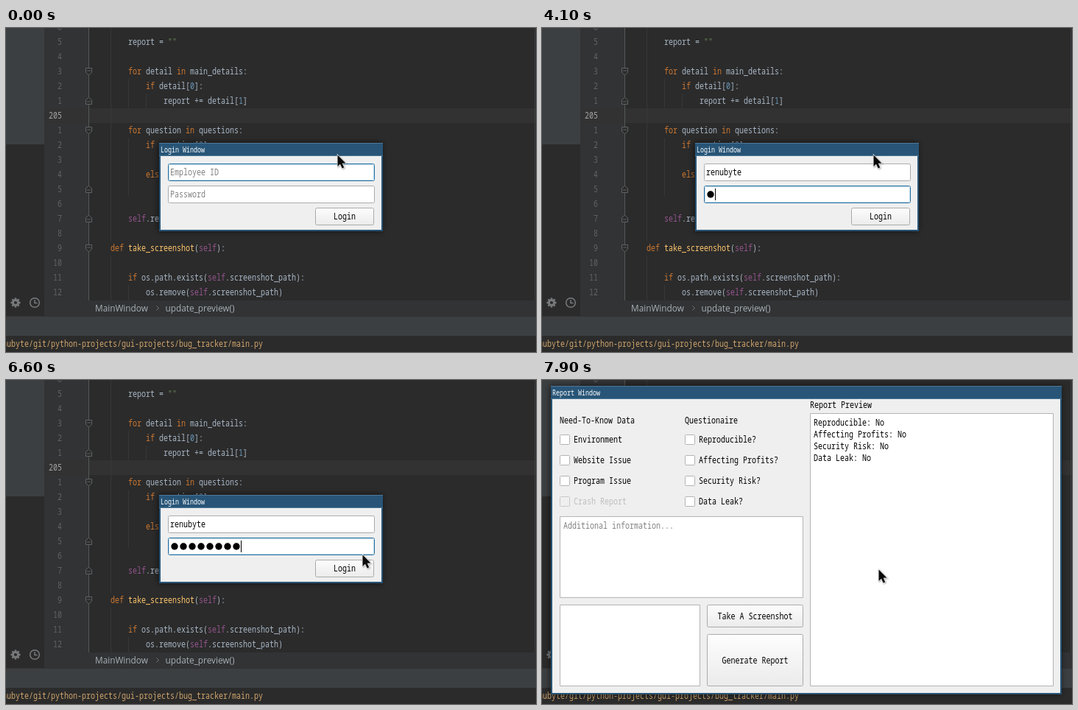
An HTML page with a canvas that plays this animation: 720x440 px, repeating every 8 s.

```html
<!DOCTYPE html>
<html lang="en">
<head>
<meta charset="utf-8">
<title>Login to report window</title>
<style>
html, body { margin: 0; width: 100%; height: 100%; overflow: hidden; background: #2b2b2b; }
canvas { display: block; width: 720px; height: 440px; }
</style>
</head>
<body>
<canvas id="stage" width="720" height="440"></canvas>
<script>
const ctx = document.getElementById('stage').getContext('2d');
const LOOP = 8000;
const USER = 'renubyte';
const CONDENSE = 5 / 6; // narrow coding face: advance is half the font size
const BLUE = '#285577', FOCUS = '#2670a0', OUTLINE = '#ababab', FACE = '#efefef';

// Time at which each value starts.
const typed = [[0, 0], [1200, 1], [1400, 2], [1500, 3], [1800, 4], [1900, 5], [2300, 6], [2700, 7], [2900, 8]];
const dots = [[0, 0], [4100, 1], [4300, 3], [4600, 4], [5000, 5], [5100, 6], [5200, 7], [5500, 8]];
const caret = [[0, 0], [100, 1], [500, 0], [1000, 1], [3500, 0], [3600, 1], [6100, 0], [6600, 1], [7100, 0]];
const at = (track, t) => track.findLast(([start]) => t >= start)[1];

function rect(x, y, w, h, color) {
  ctx.fillStyle = color;
  ctx.fillRect(x, y, w, h);
}

function text(str, x, baseline, color, size = 12) {
  ctx.save();
  ctx.translate(x, baseline);
  ctx.scale(CONDENSE, 1);
  ctx.font = `${size}px "Noto Sans Mono", "DejaVu Sans Mono", monospace`;
  ctx.fillStyle = color;
  ctx.fillText(str, 0, 0);
  ctx.restore();
}

function path(points, closed = true) {
  ctx.beginPath();
  points.forEach(([x, y]) => ctx.lineTo(x, y));
  if (closed) ctx.closePath();
}

function frame(x, y, w, h, fill, stroke, radius = 2) {
  ctx.beginPath();
  ctx.roundRect(x + .5, y + .5, w - 1, h - 1, radius);
  ctx.fillStyle = fill;
  ctx.fill();
  ctx.lineWidth = 1;
  ctx.strokeStyle = stroke;
  ctx.stroke();
}

// ---- Editor behind the windows ----

const SYNTAX = /(\b(?:for|in|if|else|def|self|take_screenshot)\b|""|\b\d\b)/;
function tokenColor(token) {
  if (token === 'self') return '#94558d';
  if (token === 'take_screenshot') return '#ffc66d';
  if (token === '""') return '#6a8759';
  if (/^\d$/.test(token)) return '#6897bb';
  return SYNTAX.test(token) ? '#cc7832' : '#a9b7c6';
}

const lines = [
  '', '    report = ""', '', '    for detail in main_details:', '        if detail[0]:',
  '            report += detail[1]', '', '    for question in questions:',
  '        if question[0]:', '            report += question[1]', '        else:',
  '            report += question[2]', '', '    self.report = report', '',
  'def take_screenshot(self):', '', '    if os.path.exists(self.screenshot_path):',
  '        os.remove(self.screenshot_path)'
];
const CURRENT = 6;

function foldMark(y, dir) {
  path([[-4, -4.5], [4, -4.5], [4, 1], [0, 5], [-4, 1]].map(([px, py]) => [112.5 + px, y + py * dir]));
  ctx.fillStyle = '#2b2b2b';
  ctx.fill();
  ctx.strokeStyle = '#606366';
  ctx.stroke();
  rect(110, y - dir - .5, 5, 1, '#606366');
}

function toolIcons() {
  ctx.strokeStyle = ctx.fillStyle = '#777a7c';
  ctx.lineWidth = 3;
  ctx.beginPath();
  ctx.arc(13, 373, 3.6, 0, 7);
  ctx.stroke();
  for (let i = 0; i < 8; i++) {
    ctx.save();
    ctx.translate(13, 373);
    ctx.rotate(i * Math.PI / 4);
    ctx.fillRect(-1.2, -6.6, 2.4, 2.5);
    ctx.restore();
  }
  ctx.lineWidth = 1.5;
  ctx.beginPath();
  ctx.arc(39, 373, 6.3, 0, 7);
  ctx.stroke();
  path([[39, 369], [39, 373.5], [42.5, 373.5]], false);
  ctx.stroke();
  ctx.lineWidth = 1;
}

function editor() {
  rect(0, 0, 720, 440, '#2b2b2b');
  rect(0, 0, 52, 158, '#3c3f41');
  rect(52, 0, 60, 370, '#313335');
  rect(52, 109, 668, 20, '#323232');
  rect(718, 0, 1, 370, '#3c3f41');

  for (const [x, y, h] of [[142, 0, 289], [142, 309, 61], [166, 69, 40], [166, 149, 80],
                           [166, 349, 21], [190, 89, 20]]) rect(x, y, 1, h, '#373737');
  rect(112, 0, 1, 370, '#555759');
  for (const [y, dir] of [[59, 1], [99, -1], [139, 1], [219, -1], [259, -1], [299, 1]]) foldMark(y, dir);

  lines.forEach((line, i) => {
    const baseline = 3 + i * 20;
    const number = i === CURRENT ? '205' : String(Math.abs(i - CURRENT));
    text(number, 76 - number.length * 6, baseline, i === CURRENT ? '#a4a3a3' : '#606366');
    let x = 142;
    for (const token of line.split(SYNTAX)) {
      text(token, x, baseline, tokenColor(token));
      x += token.length * 6;
    }
  });

  rect(52, 370, 668, 21, '#313335');
  rect(0, 391, 720, 1, '#323232');
  rect(0, 392, 720, 26, '#3c3f41');
  ctx.font = '11.8px "Open Sans", "Noto Sans", sans-serif';
  ctx.fillStyle = '#a9b0b6';
  ctx.fillText('MainWindow', 121, 385);
  ctx.fillText('update_preview()', 216.5, 385);
  path([[204.5, 377.5], [207.5, 380.5], [204.5, 383.5]], false);
  ctx.strokeStyle = '#777a7c';
  ctx.stroke();
  toolIcons();
  text(USER + '/git/python-projects/gui-projects/bug_tracker/main.py', -17, 433, '#d0a56c');
}

// ---- Windows ----

function windowFrame(x, y, w, h, title) {
  ctx.save();
  ctx.shadowColor = 'rgba(0,0,0,.6)';
  ctx.shadowBlur = 8;
  ctx.shadowOffsetX = -1;
  rect(x, y, w, h, BLUE);
  ctx.restore();
  rect(x, y, w, 1, '#4c7899');
  rect(x, y + 17, w, 1, '#4c7899');
  rect(x + 2, y + 18, w - 4, h - 20, FACE);
  text(title, x + 2, y + 13, '#fff', 10);
}

function button(label, x, y, w, h, focused) {
  const fill = ctx.createLinearGradient(0, y, 0, y + h);
  fill.addColorStop(0, '#fdfdfd');
  fill.addColorStop(1, focused ? '#f6f6f6' : '#ebebeb');
  frame(x, y, w, h, fill, focused ? FOCUS : OUTLINE);
  text(label, x + w / 2 - label.length * 3, y + h / 2 + 4, '#000');
}

function field(y, focused) {
  frame(220, y, 281, 24, '#fff', focused ? FOCUS : OUTLINE);
  if (focused) frame(221, y + 1, 279, 22, '#fff', '#c4dced', 1);
}

function pointer(x, y) {
  ctx.save();
  ctx.translate(x, y);
  path([[.5, .5], [.5, 16], [4, 12.8], [6.6, 18.6], [9.2, 17.4], [6.7, 11.8], [11.4, 11.6]]);
  ctx.shadowColor = 'rgba(0,0,0,.35)';
  ctx.shadowBlur = 2;
  ctx.shadowOffsetX = ctx.shadowOffsetY = 1;
  ctx.lineWidth = 1.4;
  ctx.strokeStyle = '#e8e8e8';
  ctx.stroke();
  ctx.shadowColor = 'transparent';
  ctx.fillStyle = '#0a0a0a';
  ctx.fill();
  ctx.restore();
}

function loginWindow(t) {
  const inPassword = t >= 3600, clicked = t >= 7200;
  const name = USER.slice(0, at(typed, t)), count = at(dots, t);
  windowFrame(208, 156, 304, 120, 'Login Window');
  field(184, !inPassword);
  field(214, inPassword && !clicked);
  text(name || 'Employee ID', 223, 200, name ? '#000' : '#808080');
  if (!count) text('Password', 223, 230, '#808080');
  ctx.fillStyle = '#000';
  for (let i = 0; i < count; i++) {
    ctx.beginPath();
    ctx.arc(229 + i * 12, 226, 4.7, 0, 7);
    ctx.fill();
  }
  if (at(caret, t)) {
    rect(223 + (inPassword ? count * 12 : name.length * 6), inPassword ? 218 : 188, 1, 16, '#000');
  }
  button('Login', 420, 244, 80, 24, clicked);
}

function checkbox(label, x, y, disabled) {
  frame(x, y - 7, 14, 14, disabled ? FACE : '#fff', disabled ? '#c8c8c8' : '#b4b4b4', 1);
  text(label, x + 19, y + 4, disabled ? '#bebebe' : '#000');
}

function reportWindow() {
  windowFrame(12, 8, 694, 419, 'Report Window');
  text('Need-To-Know Data', 24, 59, '#000');
  text('Questionaire', 194, 59, '#000');
  text('Report Preview', 364, 38, '#000');
  ['Environment', 'Website Issue', 'Program Issue', 'Crash Report']
    .forEach((label, i) => checkbox(label, 24, 81 + i * 28, i === 3));
  const questions = ['Reproducible', 'Affecting Profits', 'Security Risk', 'Data Leak'];
  frame(364, 45, 331, 371, '#fff', '#b4b4b4', 0);
  questions.forEach((label, i) => {
    checkbox(label + '?', 194, 81 + i * 28);
    text(label + ': No', 369, 62 + i * 16, '#000');
  });
  frame(24, 185, 331, 111, '#fff', '#b4b4b4', 0);
  text('Additional information...', 29, 202, '#808080');
  frame(24, 305, 191, 111, '#fff', '#b4b4b4', 0);
  button('Take A Screenshot', 224, 305, 131, 31);
  button('Generate Report', 224, 345, 131, 71);
}

function pointerPosition(t) {
  if (t >= 7900) return [457, 257];
  const p = Math.min(1, Math.max(0, Math.floor((t - 6200) / 100) / 9));
  return [450 + 10 * p + 30 * Math.sin(Math.PI * p), 172 + 86.5 * Math.sin(1.9 * p)].map(Math.round);
}

function draw(t) {
  editor();
  if (t < 7300) loginWindow(t);
  else reportWindow();
  pointer(...pointerPosition(t));
}

const start = performance.now();
function tick() {
  draw((performance.now() - start) % LOOP);
  requestAnimationFrame(tick);
}
tick();
</script>
</body>
</html>
```
